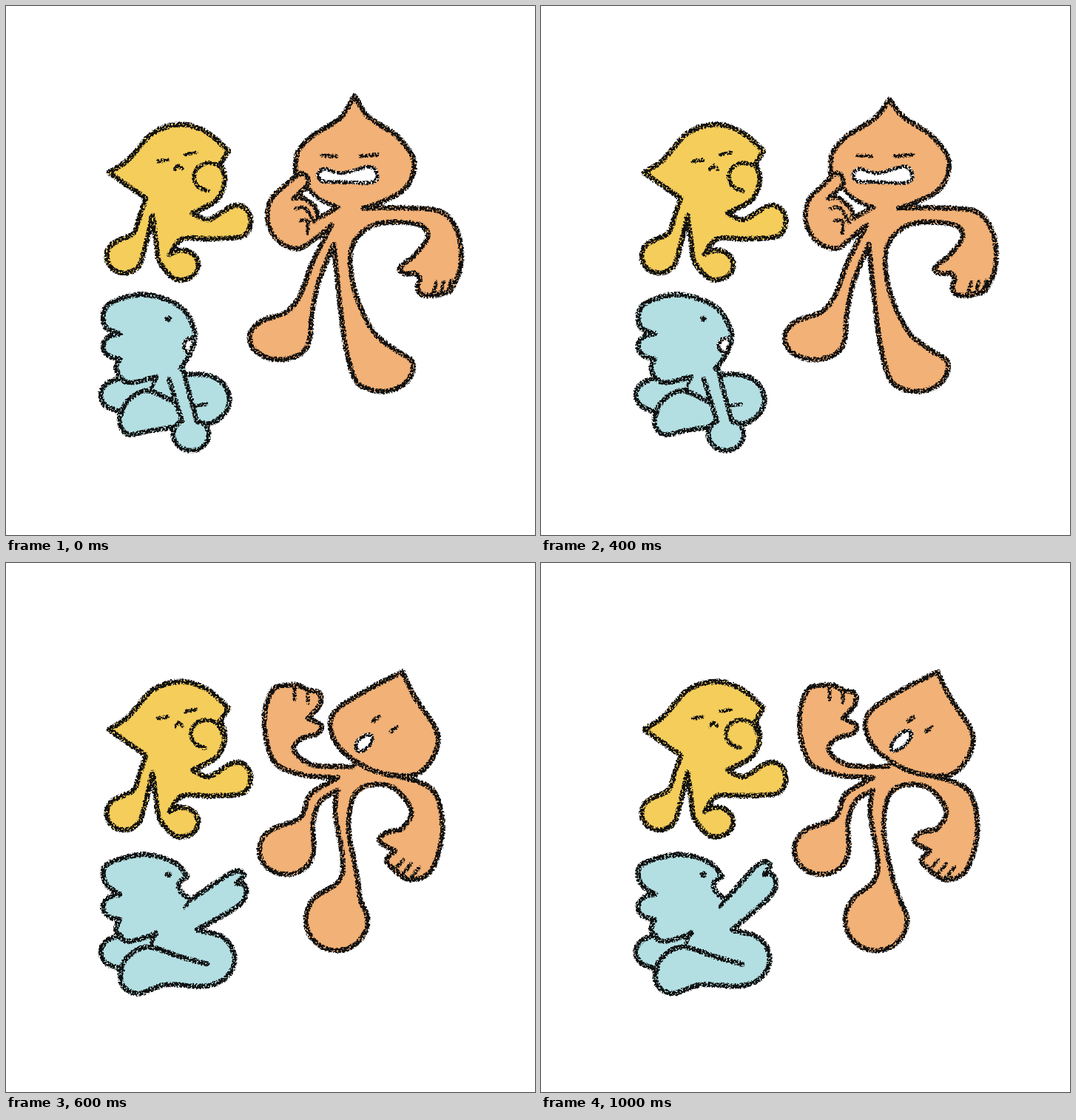
Write an HTML page that moves like this. It is 715x715 px and loops after 1.2 s.

```html
<!DOCTYPE html>
<html>
<head>
<meta charset="utf-8">
<style>
  html, body { margin: 0; height: 100%; overflow: hidden; background: #fff; }
  svg { display: block; width: 100%; height: 100%; }
</style>
</head>
<body>
<svg viewBox="0 0 715 715">
  <filter id="crayon" filterUnits="userSpaceOnUse" x="0" y="0" width="715" height="715" color-interpolation-filters="sRGB">
    <feGaussianBlur in="SourceGraphic" stdDeviation="1.6" result="soft"/>
    <feTurbulence id="grain" type="fractalNoise" baseFrequency=".42" numOctaves="2" result="noise"/>
    <feComposite in="soft" in2="noise" operator="arithmetic" k1="3.2" k2="-.7" k3="0" k4="0"/>
    <feColorMatrix values="0 0 0 0 .06  0 0 0 0 .06  0 0 0 0 .06  0 0 0 3 -.95"/>
  </filter>
  <g id="paint" stroke-width="4" stroke-linejoin="round"></g>
  <g id="ink" fill="none" stroke="#000" stroke-linecap="round" stroke-linejoin="round" filter="url(#crayon)"></g>
</svg>
<script>
const $ = id => document.getElementById(id);
const YELLOW = '#f5cd5b', ORANGE = '#f2b176', BLUE = '#b3dfe3', WHITE = '#fff';
const BOLD = 6.8, FINE = 4.8;

// Smooth curve through "x y x y ..."; a slash makes the point before it a corner.
function curve(text) {
  let path = '', last;
  for (const part of text.split('/')) {
    const n = part.trim().split(/\s+/).map(Number);
    const p = last ? [last] : [];
    for (let i = 0; i < n.length; i += 2) p.push([n[i], n[i + 1]]);
    if (!last) path = 'M' + p[0];
    for (let i = 0; i < p.length - 1; i++) {
      const a = p[i - 1] || p[i], b = p[i], c = p[i + 1], d = p[i + 2] || c;
      path += 'C' + [0, 1].map(j => b[j] + (c[j] - a[j]) / 6) +
              ' ' + [0, 1].map(j => c[j] - (d[j] - b[j]) / 6) + ' ' + c;
    }
    last = p[p.length - 1];
  }
  return path;
}

// Point at (x, y) from a centre, turned by an angle in degrees.
function turn(cx, cy, x, y, angle) {
  const a = angle * Math.PI / 180, c = Math.cos(a), s = Math.sin(a);
  return `${cx + x * c - y * s} ${cy + x * s + y * c}`;
}

// Points along an ellipse, angles in degrees, clockwise from the right.
function arc(cx, cy, rx, ry, from, to, tilt = 0) {
  const steps = Math.ceil(Math.abs(to - from) / 40);
  return Array.from({ length: steps + 1 }, (_, i) => {
    const a = (from + (to - from) * i / steps) * Math.PI / 180;
    return turn(cx, cy, rx * Math.cos(a), ry * Math.sin(a), tilt);
  }).join(' ');
}

const shape = (fill, width, points) => ({ fill, width, d: curve(points) });
const line = (points, width = FINE) => shape(null, width, points);
const patch = (fill, points) => shape(fill, 0, points);
const dot = (x, y) => line(`${x} ${y} ${x + 1} ${y}`, 8.5);
const fingers = (count, x, y, stepX, stepY, dx, dy) => Array.from({ length: count }, (_, i) =>
  line(`${x + i * stepX} ${y + i * stepY} ${x + i * stepX + dx} ${y + i * stepY + dy}`));

const yellow = noseX => [
  shape(YELLOW, BOLD, `139 225 165 208 198 172 236 160 272 171 301 196/290 213/296 235 285 262 252 280/272 289 290 280
    ${arc(312, 291, 19, 22, -120, 80)} 275 315 238 315 221 336/${arc(237, 350, 23, 20, -100, 120)} 207 345 203 320
    198 283/192 310 187 330 ${arc(160, 338, 24, 23, 30, 260)} 173 306 181 283 189 260/139 225`),
  line(arc(noseX, 231, 21, 19, 95, 360), 5.5),
  line('205 210 219 208'), line('242 201 257 198'),
  line('228 221/233 215/239 221', 4.5)
];

function orangeStanding(k) {
  const x = 2 * k, head = [471, 216, 81, 57];
  return [
    patch(ORANGE, '430 300/445 268/470 255/490 270/460 310'),
    patch(ORANGE, '391 226/409 247/449 272/483 273/470 230'),
    shape(ORANGE, BOLD, `483 273 545 273 590 279 612 310 614 355 600 386/580 391 562 390 556 381 560 368/553 361 540 362
      532 354 552 337 570 312 556 295 500 295 468 325 470 380 495 438 525 464 ${arc(508, 488, 42, 33, -15, 150)}
      459 460 451 400 443 322/422 375 413 420 ${arc(370, 449, 41, 29, 0, 235)} 378 414 397 392 415 345 440 296`),
    shape(ORANGE, BOLD, `483 273 ${arc(...head, 75, -45)} 490 150 471 ${121 + 2.5 * k}/452 151
      ${arc(...head, -135, -190)}`),
    line('409 247 425 262 449 272', 6),
    shape(ORANGE, 6.5, `449 272 422 287/418 272 400 259 388 260/400 250 409 238 400 226
      ${arc(395 + x, 283, 42, 45, -115, -270)} 420 313 440 296`),
    line('391 274 404 273 417 293'), line('397 290 408 291 407 308'),
    ...fingers(3, 578, 386, 10, -1, 4, -13),
    shape(WHITE, FINE, '421 228 430 220 455 226 492 217 502 231 492 239 455 238 428 237 421 228'),
    line('427 202 447 203'), line('478 203 503 201')
  ];
}

function orangeWaving(k) {
  const x = 6 * Math.min(k, 1);
  return [
    patch(ORANGE, '445 305/470 272/540 285/530 297/495 296/465 318'),
    shape(ORANGE, BOLD, `470 275 415 273 389 253 400 237 421 231 426 219 408 210/424 192 424 176 408 172/395 165 383 165/
      360 172 349 215 362 268 400 286 449 290/412 312 402 338 390 349 ${arc(379, 388, 37, 33, 240, 0)}
      415 350 425 322 449 307`),
    shape(ORANGE, BOLD, `447 310 445 340 455 400 450 430 ${arc(447 + x, 482, 42, 42, 225, -40)} 474 420 463 355
      476 307 520 302 548 335 535 360/512 365 505 377 526 389/514 402 525 415/546 428 575 415 590 360 577 307 530 288`),
    shape(ORANGE, BOLD, `536 147/553 182 584 234 567 277 535 288 488 277 447 245 441 206 482 175 536 147`),
    ...fingers(2, 390, 168, 18, 4, 0, 17),
    ...fingers(3, 526, 414, 11, 5, 11, -13),
    shape(WHITE, FINE, arc(484 + x / 2, 243 - x / 2, 14 + 2 * k, 8, 0, 360, -45)),
    line('496 214 504 208', 5.5), line('520 228 528 222', 5.5)
  ];
}

const hair = y => `/${arc(154, 460 + y, 23, 17, -90, -270)}/149 ${492 + y} 165 ${509 + y / 2} 203 501`;
const farFoot = shape(BLUE, BOLD, `155 503 ${arc(150, 526, 22, 20, -120, -260)} 157 550`);

function blueSitting(k) {
  const x = 2 * Math.min(k, 1);
  return [
    patch(BLUE, '157 505/205 495/240 487/245 502/270 560/225 570/155 546'),
    shape(BLUE, BOLD, `243 498 ${arc(264, 532, 38, 34, -80, 60)} 270 565`),
    farFoot,
    shape(BLUE, 6.5, '228 569 195 574 165 579 153 560 165 533 192 520 226 535'),
    shape(BLUE, 6.5, `238 488 258 562/${arc(250, 579, 24, 22, -40, 230)} 238 562/220 504`),
    shape(BLUE, BOLD, `236 490 ${250 + x} 467 ${255 + x} 440 235 406 185 390 138 404 133 432 152 443${hair(0)}`),
    shape(WHITE, FINE, arc(250, 459, 10, 10, 275, 85)),
    line('202 505 196 518'), line('258 540 271 538'),
    dot(219, 423)
  ];
}

function bluePointing(k) {
  const arm = (px, py) => turn(245, 478, px, py, -5.5 * k);
  return [
    patch(BLUE, '155 505/203 498/272 542/190 530/157 550'),
    farFoot,
    shape(BLUE, BOLD, `272 542 238 533 190 519 160 538 156 568 178 582 215 570 255 572 ${arc(270, 535, 39, 36, 80, -60)}
      258 496/${arm(68, -14)} ${arm(80, -33)} ${arm(76, -45)}/${arm(66, -45)}/${arm(77, -56)} ${arm(69, -62)}
      ${arm(55, -57)}/250 455/236 444 234 432 245 424/228 405 185 394 136 408 134 432 152 447${hair(5)}`),
    line('250 455 241 466'), line('203 498 195 517'),
    dot(219, 421)
  ];
}

const frames = Array.from({ length: 6 }, (_, i) => {
  const k = i % 3;
  const shapes = i < 3
    ? [...yellow(275), ...orangeStanding(k), ...blueSitting(k)]
    : [...yellow(271), ...orangeWaving(k), ...bluePointing(k)];
  return {
    paint: shapes.filter(s => s.fill).map(s => `<path fill="${s.fill}" stroke="${s.fill}" d="${s.d}Z"/>`).join(''),
    ink: shapes.filter(s => s.width).map(s => `<path stroke-width="${s.width}" d="${s.d}"/>`).join('')
  };
});

const start = performance.now();
let shown = -1;
function tick() {
  const i = Math.floor((performance.now() - start) / 200) % 6;
  if (i !== shown) {
    shown = i;
    $('grain').setAttribute('seed', i + 1);
    $('paint').innerHTML = frames[i].paint;
    $('ink').innerHTML = frames[i].ink;
  }
  requestAnimationFrame(tick);
}
tick();
</script>
</body>
</html>
```
